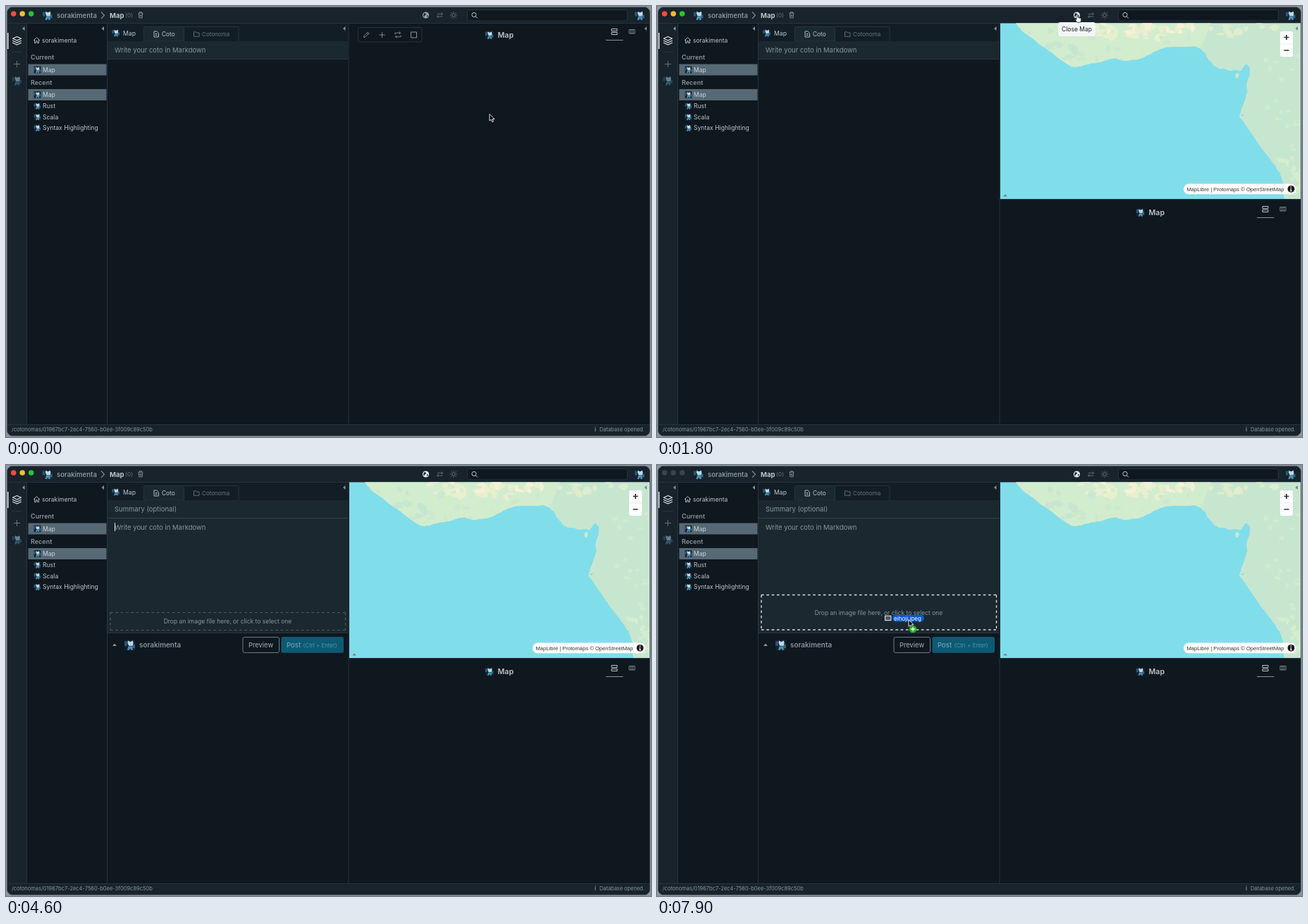
Recreate the animation shown at these times as an HTML page. Size 915 px wide and 612 px high, loop 8 s.

```html
<!DOCTYPE html>
<html lang="en">
<head>
<meta charset="utf-8">
<title>Notes with a map</title>
<style>
  html, body { margin: 0; width: 100%; height: 100%; overflow: hidden; background: #8c9497; }
  svg { display: block; width: 915px; height: 612px; font-family: Inter, "Open Sans", sans-serif; }
  text { white-space: pre; }
</style>
</head>
<body>
<svg id="stage" viewBox="0 0 915 612" xmlns="http://www.w3.org/2000/svg"></svg>
<script>
const LOOP = 8000, STEP = 100;
const C = {
  pane: '#0f171f', bar: '#18232b', input: '#1b2830', line: '#26353f',
  text: '#bcc6cd', soft: '#87959e', dim: '#66757f', pick: '#566974'
};
const USER = 'sorakimenta';

// Markup helpers
const rect = (x, y, w, h, fill, more = '') =>
  `<rect x="${x}" y="${y}" width="${w}" height="${h}" fill="${fill}" ${more}/>`;
const path = (d, stroke, width = 1, more = '') =>
  `<path d="${d}" fill="none" stroke="${stroke}" stroke-width="${width}" ${more}/>`;
const shape = (d, fill, more = '') => `<path d="${d}" fill="${fill}" ${more}/>`;
const disc = (x, y, r, fill, more = '') => `<circle cx="${x}" cy="${y}" r="${r}" fill="${fill}" ${more}/>`;
const text = (x, mid, size, fill, str, more = '') =>
  `<text x="${x}" y="${(mid + size * 0.36).toFixed(2)}" font-size="${size}" fill="${fill}" ${more}>${str}</text>`;
const group = (id, body, more = '') => `<g id="${id}" ${more}>${body}</g>`;
const at = (x, y, body) => `<g transform="translate(${x} ${y})">${body}</g>`;
const avatar = (x, y, s, more = '') =>
  `<use href="#avatar" x="${x}" y="${y}" width="${s}" height="${s}" ${more}/>`;
const leftTip = (x, y, fill = C.soft) => shape(`M${x - 2} ${y}l3.5-3v6z`, fill);
const upTip = (x, y, fill = C.soft) => shape(`M${x} ${y - 1.8}l3 3.4h-6z`, fill);
const BOLD = 'font-weight="600"', MID = 'text-anchor="middle"', ROUND = 'stroke-linecap="round" stroke-linejoin="round"';

// Map
let seed = 41;
function rnd() {
  seed = (seed * 16807) % 2147483647;
  return seed / 2147483647;
}
const jit = a => (rnd() - 0.5) * 2 * a;

const coast = `509,24 518,36 528,43 540,52 548,58 560,66 568,73 577,79 586,85 594,87 603,85 617,81 628,80
  640,76 650,74 662,78 682,76 692,72 702,67 710,63 722,58.5 748,58 762,57 770,60 777,66 781,74 790,85
  797,89 804,89 812,92 820,91 829,92 833,85 837,82 841,88 841,99 838,105 836,113 838,121 835,131
  830,144 826,156 831,163 839,175 850,191 861,206 871,219 879,231 885,241 889,256 890,275`
  .trim().split(/\s+/).map(p => p.split(',').map(Number));

function roughen(pts, n, amp) {
  const out = [pts[0]];
  for (let i = 1; i < pts.length; i++) {
    const [a, b] = [pts[i - 1], pts[i]];
    for (let k = 1; k < n; k++) {
      const f = k / n;
      out.push([a[0] + (b[0] - a[0]) * f + jit(amp), a[1] + (b[1] - a[1]) * f + jit(amp)]);
    }
    out.push(b);
  }
  return out;
}
const poly = pts => 'M' + pts.map(p => p.map(v => v.toFixed(1)).join(' ')).join('L') + 'z';

function blob(x, y, rx, ry) {
  const pts = [];
  for (let a = 0; a < 9; a++) {
    const k = 0.55 + rnd() * 0.6, t = a / 9 * Math.PI * 2;
    pts.push([x + Math.cos(t) * rx * k, y + Math.sin(t) * ry * k]);
  }
  return poly(pts);
}
function patches(n, fill, x, y, w, h, r) {
  let d = '';
  for (let i = 0; i < n; i++) d += blob(x + rnd() * w, y + rnd() * h, r * (0.3 + rnd()), r * (0.2 + rnd() * 0.7));
  return shape(d, fill);
}

const land = poly([...roughen(coast, 3, 0.6), [915, 275], [915, 24]]);
const mapArt = `
  <clipPath id="land"><path d="${land}"/></clipPath>
  <clipPath id="mapBox"><rect x="487" y="24.5" width="426" height="249.5"/></clipPath>
  <g clip-path="url(#mapBox)">
    ${rect(487, 24, 426, 251, '#80deea')}
    <g clip-path="url(#land)">
      ${rect(487, 24, 428, 251, '#c7e6d0')}
      ${shape('M507 24H786L772 60 700 82 596 92 560 72z', '#d2ecce')}
      ${patches(16, '#c7e6d0', 520, 30, 80, 55, 9)}
      ${patches(26, '#e8efcf', 590, 24, 175, 22, 9)}
      ${patches(16, '#f6f0d6', 600, 24, 160, 14, 7)}
      ${patches(20, '#cbe8d0', 600, 42, 180, 36, 7)}
      ${patches(14, '#dfedcd', 780, 24, 100, 18, 7)}
      ${patches(22, '#d0ebcf', 860, 70, 54, 190, 5)}
      ${patches(16, '#d4eecd', 888, 210, 28, 64, 7)}
    </g>
    ${shape(blob(823, 99, 3, 4), '#cfe9c9')}
    ${shape('M880 234l5 3-3 2zM828 155l6-2-4 4z', '#80deea')}
  </g>`;

// Static window
const defs = `<defs><symbol id="avatar" viewBox="0 0 16 16">
  ${rect(1, 1, 14, 14, '#14222d')}${rect(1, 3, 3.5, 6, '#295876')}${rect(11, 7, 3.5, 5, '#2f678b')}
  ${shape('M5.500 2l2 1.500h2l2-1.500 1 3-1 4h-5l-1.500-4z', '#b9d9e8')}${shape('M6 9.500h5l1 5H9.500L8.500 12 7 14.500H4.500z', '#4f90b4')}
  </symbol></defs>`;

function sideItem(y, label, picked) {
  return (picked ? rect(31.5, y - 8, 111, 16, C.pick) : '') + avatar(39, y - 5.5, 11) +
    text(52, y, 8.6, picked ? '#c9d2d8' : C.text, label);
}

const frame = rect(1.5, 1.5, 912, 609, C.pane, 'rx="8" stroke="#566167"') +
  shape('M2 24V10a8 8 0 0 1 8-8H905a8 8 0 0 1 8 8V24z', C.bar) +
  rect(2, 24, 27.5, 570, C.bar) +
  shape('M2 594.500H913V602a8 8 0 0 1-8 8H10a8 8 0 0 1-8-8z', C.bar) +
  rect(144, 25, 341.500, 25, '#131d25') +
  path('M2 24.500H913M2 594.500H913M29.500 24.500V594M143.500 24.500V594M486 24.500V594', C.line);

const globe = `<circle r="4.6" fill="currentColor"/>` +
  shape('M-2.500-2.800l2.500.3.500 1.800-2 1.200-1 2-1-1.500zM1.500 0l2 .8-1.500 2.500z', C.bar);
const header = group('lights', [10.7, 23.2, 35.7].map(x => disc(x, 10.9, 3.75, '#39454c')).join('')) +
  avatar(51, 5.5, 16) + text(72, 13.3, 9.5, C.soft, USER, BOLD) +
  path('M135 8.500l4.500 4.700-4.500 4.700', C.soft, 1.1) +
  text(147, 13.3, 9.6, C.text, 'Map', 'font-weight="700"') + text(169, 13.3, 8.2, C.dim, '(0)') +
  path('M187.500 10.200h7M189.500 10v-1.300h3V10M188.300 10.500l.5 6.300h4.400l.5-6.300M190.200 12v3.200M191.800 12v3.200', C.soft, 0.9) +
  at(595.5, 13, group('globe', globe)) +
  path('M611.500 11.300h8m-2-2l2 2-2 2M619.500 15h-8m2-2l-2 2 2 2', C.dim, 0.9) +
  `<circle cx="635" cy="13" r="2.300" fill="none" stroke="${C.dim}"/>` +
  at(635, 13, [0, 45, 90, 135, 180, 225, 270, 315].map(a =>
    path('M0-3.800V-5.200', C.dim, 1, `transform="rotate(${a})"`)).join('')) +
  rect(654.5, 5.5, 227, 15.5, '#10181f', `rx="3" stroke="${C.line}"`) +
  `<circle cx="664" cy="12.500" r="3.100" fill="none" stroke="${C.text}"/>` + path('M666.300 14.800l2.600 2.600', C.text) +
  avatar(891, 5.5, 16);

const nav = rect(2, 38, 1.5, 23, '#e3e9ec') +
  path('M15.500 43.500l6 2.800-6 2.800-6-2.800zM9.500 49.300l6 2.800 6-2.800M9.500 52.300l6 2.800 6-2.800', '#e3e9ec', 1.1, ROUND) +
  path('M8 65.500H23', C.line) + path('M15.500 78v9M11 82.500h9', C.dim) +
  avatar(7.5, 98, 16, 'opacity=".5"') + leftTip(25, 32) + leftTip(137.5, 32);

const side = path('M39.500 48.500l4-3.800 4 3.800M40.500 48v4.500h2v-2.800h2v2.800h2V48', C.text, 0.9, ROUND) +
  text(51, 48.6, 8.5, C.text, USER) +
  text(35, 73, 9, C.soft, 'Current', BOLD) + sideItem(90.5, 'Map', true) +
  text(35, 108.5, 9, C.soft, 'Recent', BOLD) + sideItem(126, 'Map', true) +
  sideItem(142, 'Rust') + sideItem(157.5, 'Scala') + sideItem(173.2, 'Syntax Highlighting');

const tabs = avatar(149.5, 32, 12.5) + text(166, 38.6, 8.7, C.text, 'Map') +
  shape('M195.500 50V31.500a2 2 0 0 1 2-2H250.500a2 2 0 0 1 2 2V50z', C.input, `stroke="${C.line}"`) +
  path('M252.500 29.500H328a2 2 0 0 1 2 2V50', C.line) +
  path('M210 36h4l2.500 2.500v5.500h-6.500zM211.700 39.500h3M211.700 41.700h3', C.text, 0.9) +
  text(221, 39.9, 8.3, C.text, 'Coto') +
  path('M266.500 36.800h2.800l1 1.200h3.700v5.300h-7.500z', C.dim, 0.9) +
  text(278, 39.9, 8.05, C.dim, 'Cotonoma') + leftTip(480, 32);

const status = text(8, 601.4, 7.5, C.soft, '/cotonomas/01967bc7-2ec4-7560-b0ee-3f009c89c50b') +
  text(835, 601.4, 8, C.soft, 'i', BOLD) + text(842, 601.4, 7.4, C.soft, 'Database opened.');

// Editor in both sizes
const closed = rect(144, 50, 341.5, 25.5, C.input) + path('M144 75.500H485.500', C.line) +
  text(154, 62.4, 9.5, C.soft, 'Write your coto in Markdown');

const opened = rect(144, 50, 341.5, 188, C.input) + path('M144 75.500H485.500', '#33434d') +
  path('M144 238.500H485.500', C.line) +
  text(154, 62.6, 9.5, C.soft, 'Summary (optional)') +
  text(154, 88.6, 9.5, C.soft, 'Write your coto in Markdown') +
  rect(154, 82, 1, 12, '#dfe6ea', 'id="caret"') +
  `<path id="drop" fill="#111a21" stroke-dasharray="3.660 3.660"/>` +
  group('dropText', text(314.5, 0, 8.5, C.soft, 'Drop an image file here, or click to select one', MID)) +
  upTip(154, 255.3) + avatar(167, 247, 17.5) + text(189, 255, 9.9, C.soft, USER, BOLD) +
  rect(336, 244.5, 51.5, 22, 'none', 'rx="2.500" stroke="#6f7d87"') +
  text(361.5, 255.7, 9.4, '#a3afb7', 'Preview', MID) +
  rect(390.5, 244, 88.5, 22.8, '#0d5a75', 'rx="2.500"') +
  text(398, 255.7, 9.6, '#84aab9', 'Post') + text(421.5, 255.7, 7.9, '#5b8fa3', '(Ctrl + Enter)');

// Separate sides, so that every dashed edge starts at its corner
const dropBox = (top, bottom) =>
  `M148 ${top}H481.500M148 ${bottom}H481.500M148 ${top}V${bottom}M481.500 ${top}V${bottom}`;

// Right pane
const tool = rect(499.5, 30.5, 90.5, 20.5, 'none', `rx="2" stroke="${C.line}"`) +
  path('M507.500 44.500l.6-2.200 5.200-5.200 1.700 1.700-5.200 5.200zM512 38.400l1.700 1.700', C.soft, 0.9) +
  path('M533.500 37v8M529.500 41h8', C.soft, 0.9) +
  path('M552 40.500v-2.300h7.500m-1.800-1.800l1.800 1.800-1.800 1.800M560 41.500v2.300h-7.500m1.800-1.800l-1.800 1.800 1.800 1.800', C.soft, 0.9) +
  path('M574.500 37h8v8h-8z', C.soft);
const title = avatar(679, 34.5, 13.5) + text(697.5, 41, 10.7, C.text, 'Map', BOLD) +
  path('M859 32.500h8v3h-8zM859 37.500h8v3h-8z', C.text) + path('M851 48.500H875.500', C.soft) +
  path('M884 33.500h8v5.500h-8zM886.700 33.500v5.500M889.300 33.500v5.500', C.soft, 0.9);

const pill = x => rect(x, 252.5, 907 - x, 14.8, '#fff', 'rx="7.400"');
const credit = 'font-family="Liberation Sans, Arial, sans-serif"';
const mapPane = path('M486 274.800H913', C.line) + group('map', mapArt) +
  rect(884, 36, 18, 36, '#fff', 'rx="2.500"') + path('M884 54H902', '#ddd', 0.6) +
  path('M893 41v7M889.500 44.500h7M889.500 63h7', '#2f2f2f', 1.7) +
  group('shortCredit', pill(853) + text(857, 259.8, 7.7, '#333', 'MapLibre', credit)) +
  group('fullCredit', pill(747) +
    text(751.5, 259.8, 7.6, '#333', 'MapLibre | Protomaps © OpenStreetMap', credit)) +
  disc(899.5, 259.8, 4.9, '#181818') + path('M899.300 258.800v3.800M898.300 262.600h2.400', '#fff', 1.2) +
  disc(899.4, 256.9, 0.8, '#fff') + upTip(494, 269, '#71858e');

// Overlays
const tip = rect(569, 23, 53, 20, '#f4f5f6', 'rx="3"') +
  `<text id="tipText" x="595.500" y="36" font-size="8.500" fill="#20262b" text-anchor="middle"></text>`;
const OUT = 'stroke="#fff" stroke-width=".9" stroke-linejoin="round"';
const arrow = shape('M0 0V9.600l2.300-2 1.500 3.500 1.700-.7-1.500-3.400h3z', '#000', OUT);
const hand = shape('M-1-1a1 1 0 0 1 2 0v3.500l4 .8q1 .3 .8 1.500l-.8 4.500h-4.800l-3-3.700q.3-1.200 1.800-.2z', '#fff',
  'stroke="#222" stroke-width=".8"');
const grab = shape('M-4 1q1-1 2 .5V-3q.9-1 1.600 0v-1q.9-1 1.700 0v1q.9-.8 1.600 0v1.500q.8-.6 1.400 0L4 4 3 6H-1.500z', '#fff',
  'stroke="#222" stroke-width=".8"');
const beamD = 'M-2.500-5.500Q0-5.500 0-4V4Q0 5.500-2.500 5.500M2.500-5.500Q0-5.500 0-4M0 4Q0 5.500 2.500 5.500M-1.300 1.500h2.600';
const beam = path(beamD, '#111', 2.4) + path(beamD, '#e8ecee', 1.1);
const file = rect(-33.5, -4, 9.5, 7.5, '#cfd6da') + rect(-32.3, -2.8, 7.1, 5.1, '#4c5a62') +
  rect(-22.5, -4.8, 45, 9.6, '#0b57cf', 'rx="4.700"') +
  text(-20.5, 0.1, 8.05, '#fff', 'eihoji.jpeg') + at(0.5, 2, arrow) +
  group('plus', disc(6.5, 15.3, 5.3, '#25b81f') + path('M6.500 12.500v5.600M3.700 15.300h5.600', '#fff', 1.4));

document.getElementById('stage').innerHTML = defs + frame + header + nav + side + tabs + status +
  group('closed', closed) + group('opened', opened) + group('tool', tool) +
  group('mapPane', mapPane) + group('title', title) + leftTip(907.5, 32, '#75868f') + group('tip', tip) +
  group('cursor', group('arrow', arrow) + group('hand', hand) + group('grab', grab) + group('beam', beam)) +
  group('file', file);

const el = {};
document.querySelectorAll('[id]').forEach(e => { el[e.id] = e; });
const show = (id, on) => { el[id].style.display = on ? '' : 'none'; };
const fade = (id, o) => { el[id].style.opacity = o; };
const move = (id, x, y) => el[id].setAttribute('transform', `translate(${x.toFixed(2)} ${y.toFixed(2)})`);
const attrs = (id, o) => { for (const k in o) el[id].setAttribute(k, o[k]); };
const clamp = v => Math.max(0, Math.min(1, v));

// Keys are [time, x, y]
const mouse = [[0, 686, 153.5], [100, 687, 156], [200, 687, 159], [400, 670, 120], [600, 625, 48],
  [800, 599, 17], [900, 596, 14], [2500, 596, 14], [2700, 574, 26], [2900, 492, 46], [3100, 408, 60],
  [3300, 387, 64], [3900, 387, 64], [4000, 420, 52], [4100, 540, 37], [4200, 720, 88], [4300, 906, 176]];
const drag = [[6300, 818, 145], [6400, 760, 149], [6600, 590, 163], [6800, 474, 176], [6900, 447.5, 180],
  [7100, 424, 192], [7200, 410, 206], [7500, 377, 215], [7900, 356.5, 217.7]];

function along(keys, t) {
  let i = 1;
  while (i < keys.length - 1 && keys[i][0] < t) i++;
  const [a, b] = [keys[i - 1], keys[i]], f = clamp((t - a[0]) / (b[0] - a[0]));
  return [a[1] + (b[1] - a[1]) * f, a[2] + (b[2] - a[2]) * f];
}

function draw(t) {
  const mapOpen = t >= 1700, loaded = t >= 1800, editing = t >= 3500, focused = t < 5000, over = t >= 7200;

  ['#fa4a40', '#f6bd2e', '#25c63a'].forEach((c, i) =>
    el.lights.children[i].setAttribute('fill', focused ? c : '#39454c'));
  el.globe.style.color = mapOpen ? '#dfe6ea' : '#94a3ac';

  fade('tool', clamp((900 - t) / 200));
  show('mapPane', mapOpen);
  show('map', loaded);
  show('shortCredit', !loaded);
  show('fullCredit', loaded);
  move('title', 0, mapOpen ? 252 : 0);

  show('tip', t >= 1000 && t < 2700);
  fade('tip', t < 2600 ? clamp((t - 900) / 300) : 0.4);
  el.tipText.textContent = mapOpen ? 'Close Map' : 'Open Map';

  show('closed', !editing);
  show('opened', editing);
  show('caret', focused && (t - 3600) % 1000 < 500);
  attrs('drop', over
    ? { d: dropBox(184.5, 234), stroke: '#d3dade', 'stroke-width': 1.4 }
    : { d: dropBox(209.5, 234.5), stroke: '#4a5a64', 'stroke-width': 1.2 });
  move('dropText', 0, over ? 209.8 : 222.3);

  const [x, y] = along(mouse, t);
  const kind = t >= 800 && y < 24 ? 'hand'
    : mapOpen && x > 487 && y > 25 ? 'grab'
    : mapOpen && x < 485 && y > 50 ? 'beam' : 'arrow';
  for (const k of ['arrow', 'hand', 'grab', 'beam']) show(k, k === kind);
  show('cursor', t < 4400);
  move('cursor', x, y);

  show('file', t >= 6300);
  show('plus', t >= 7300);
  move('file', ...along(drag, t));
}

const start = performance.now();
function tick() {
  const t = (performance.now() - start) % LOOP;
  draw(Math.floor(t / STEP) * STEP);
  requestAnimationFrame(tick);
}
tick();
</script>
</body>
</html>
```
